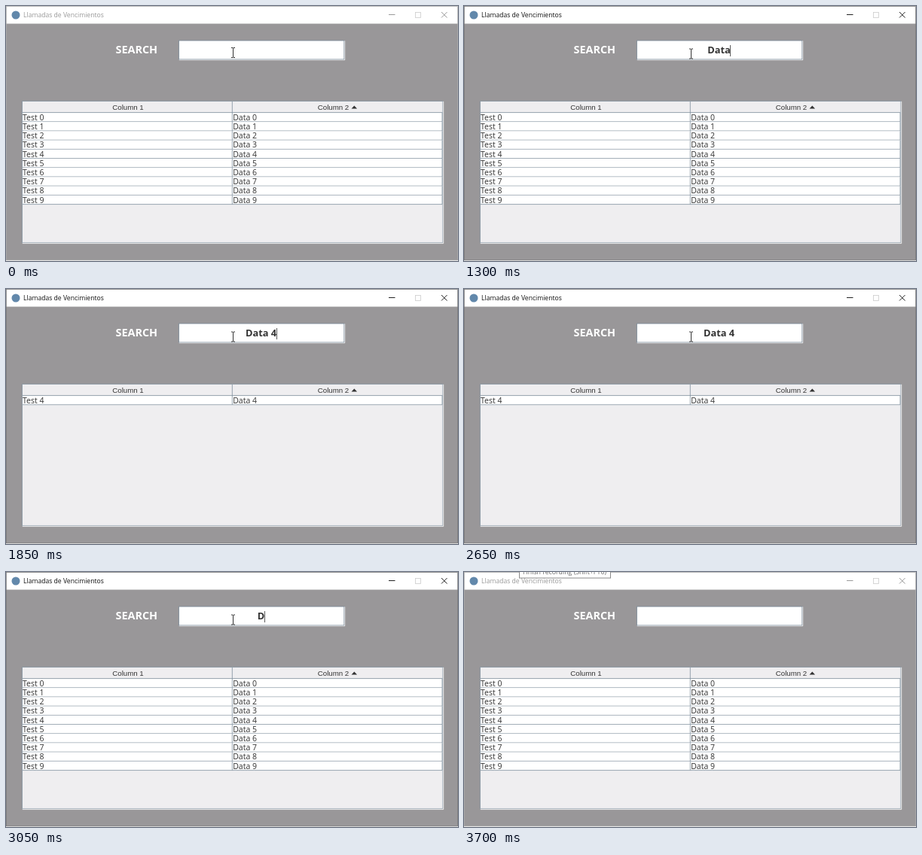
Animation of 600 by 339 pixels, one loop 3.75 s. Source, as an HTML page:

```html
<!DOCTYPE html>
<html lang="es">
<head>
<meta charset="utf-8">
<title>Llamadas de Vencimientos</title>
<style>
  html, body { margin: 0; width: 100%; height: 100%; overflow: hidden; background: #fff; }
  svg { display: block; width: 600px; height: 339px; }
  text { font-family: "Open Sans", "Noto Sans", sans-serif; white-space: pre; }
  .head { font: 9.7px "Liberation Sans", Arial, sans-serif; fill: #333; text-anchor: middle; }
  .cell { font-size: 10.5px; fill: #333; }
  .bold { font-weight: 700; }
  .line { fill: none; stroke: #7a8a99; stroke-width: .77; }
  .light { fill: none; stroke: #fff; stroke-width: .77; }
</style>
</head>
<body>
<svg viewBox="0 0 600 339">
  <rect width="600" height="339" fill="#fff"/>
  <rect y="23.5" width="600" height="314.5" fill="#999799"/>
  <rect id="frame" x=".4" y=".4" width="599.2" height="337.5" fill="none" stroke-width=".77"/>

  <circle cx="13" cy="12" r="5.5" fill="#6288ab"/>
  <text id="title" x="23" y="15.3" font-size="8.6">Llamadas de Vencimientos</text>
  <g id="buttons" fill="none">
    <path d="M508 11.5h8.5M578 8l7.5 7.5M585.5 8l-7.5 7.5"/>
    <rect x="543.5" y="8.5" width="7" height="7" stroke="#ccc" stroke-width=".8"/>
  </g>
  <g id="tip">
    <rect x="73.5" y="-12" width="121" height="20" fill="#fff" stroke="#8a8a8a"/>
    <text x="78" y="2.8" font-size="8.8" fill="#6a6a6a">Finish recording (Shift+F10)</text>
  </g>

  <text class="bold" x="145.5" y="63.3" font-size="14.4" fill="#fff">SEARCH</text>
  <rect x="229.6" y="46" width="219.9" height="25.7" fill="#fff"/>
  <path class="light" d="M230 71.7H449.7V46.5"/>
  <rect class="line" x="229.6" y="46" width="219.2" height="24.9"/>
  <text id="query" class="bold" y="63.3" font-size="12.8" fill="#333"></text>
  <path id="caret" stroke="#333" stroke-width=".8" d="M0 52V67"/>

  <rect x="21.4" y="126.4" width="559" height="189" fill="#efeef0"/>
  <g id="rows"></g>
  <path class="line" d="M21.4 126.4H579.9V314.8H21.4ZM22 141.6H579.5M300.3 127V142"/>
  <path class="light" d="M22 315.6H580.7V127"/>
  <text class="head" x="162" y="138">Column 1</text>
  <text class="head" x="434.5" y="138">Column 2</text>
  <path d="M458.5 136.5h7.5l-3.75-4z" fill="#333"/>

  <path id="beam" fill="none" stroke="#333" d="M-2.5-6.5h2l.5.5.5-.5h2M0-6V6M-2.5 6.5h2l.5-.5.5.5h2"/>
  <path id="arrow" fill="#fff" stroke="#222" stroke-width=".8" d="M0 0V12L2.8 9.5 4.7 13.5 6.3 12.8 4.5 8.9H8.3Z"/>
</svg>
<script>
const LOOP = 3750, STEP = 50, CENTER = 338.5, ROW_TOP = 142, ROW_HEIGHT = 12.2;
const el = id => document.getElementById(id);
const show = (id, on) => el(id).setAttribute("visibility", on ? "visible" : "hidden");
const place = (id, x, y) => el(id).setAttribute("transform", `translate(${x} ${y})`);

// start time, text, caret shown, optional left edge before the text is centred again
const typing = [
  [0, "", false], [250, "", true], [500, "D", true], [750, "D", false],
  [800, "Da", true], [1000, "Dat", true], [1300, "Data", true],
  [1550, "Data ", true], [1650, "Data 4", true, 322], [1800, "Data 4", true],
  [2300, "Data 4", false], [2550, "Data 4", true], [2600, "Data 4", false],
  [2750, "Data ", true], [2850, "Data", true], [2900, "Dat", true],
  [3000, "Da", true], [3050, "D", true], [3100, "", true], [3650, "", false]
];

// start time, x, y
const pointer = [
  [0, 301.5, 62], [200, 301.5, 62], [350, 301.5, 63.5],
  [3100, 301.5, 63.5], [3250, 262, 50], [3400, 184, 21]
];

function pointerAt(t) {
  const i = pointer.findIndex(p => p[0] > t);
  if (i < 0) return pointer[pointer.length - 1].slice(1);
  const [t0, x0, y0] = pointer[i - 1], [t1, x1, y1] = pointer[i];
  const k = (t - t0) / (t1 - t0);
  return [x0 + (x1 - x0) * k, y0 + (y1 - y0) * k];
}

function rowMarkup(n, slot) {
  const top = ROW_TOP + slot * ROW_HEIGHT;
  const bottom = top + ROW_HEIGHT - 0.4;
  return `<rect x="22" y="${top}" width="557.5" height="${ROW_HEIGHT}" fill="#fff"/>
    <path class="line" d="M22 ${bottom}H579M300.3 ${top}V${bottom}M579 ${top}V${bottom}"/>
    <text class="cell" x="22" y="${top + 9.8}">Test ${n}</text>
    <text class="cell" x="301.2" y="${top + 9.8}">Data ${n}</text>`;
}

let filtered = null;
function drawRows(filter) {
  if (filter === filtered) return;
  filtered = filter;
  const numbers = filter ? [4] : [...Array(10).keys()];
  el("rows").innerHTML = numbers.map(rowMarkup).join("");
}

function drawQuery(t) {
  const [, text, caret, left] = typing.filter(s => s[0] <= t).pop();
  const query = el("query");
  query.textContent = text;
  const width = text ? query.getComputedTextLength() : 0;
  const x = left ?? CENTER - width / 2;
  query.setAttribute("x", x);
  place("caret", Math.floor(x + width) + 0.5, 0);
  show("caret", caret);
}

function drawPointer(t) {
  const [x, y] = pointerAt(t);
  const visible = t < 3450, inField = x > 229 && y > 45;
  place("beam", Math.floor(x) + 0.5, y);
  place("arrow", x, y);
  show("beam", visible && inField);
  show("arrow", visible && !inField);
}

function draw(time) {
  const t = Math.floor((time % LOOP) / STEP) * STEP;
  const active = t >= 100 && t < 3650;
  el("title").setAttribute("fill", active ? "#111" : "#999");
  el("buttons").setAttribute("stroke", active ? "#222" : "#999");
  el("frame").setAttribute("stroke", active ? "#777" : "#aaa");
  show("tip", t >= 3700);
  drawRows(t >= 1850 && t < 2800);
  drawQuery(t);
  drawPointer(t);
}

const start = performance.now();
function tick() {
  draw(performance.now() - start);
  requestAnimationFrame(tick);
}
tick();
</script>
</body>
</html>
```
